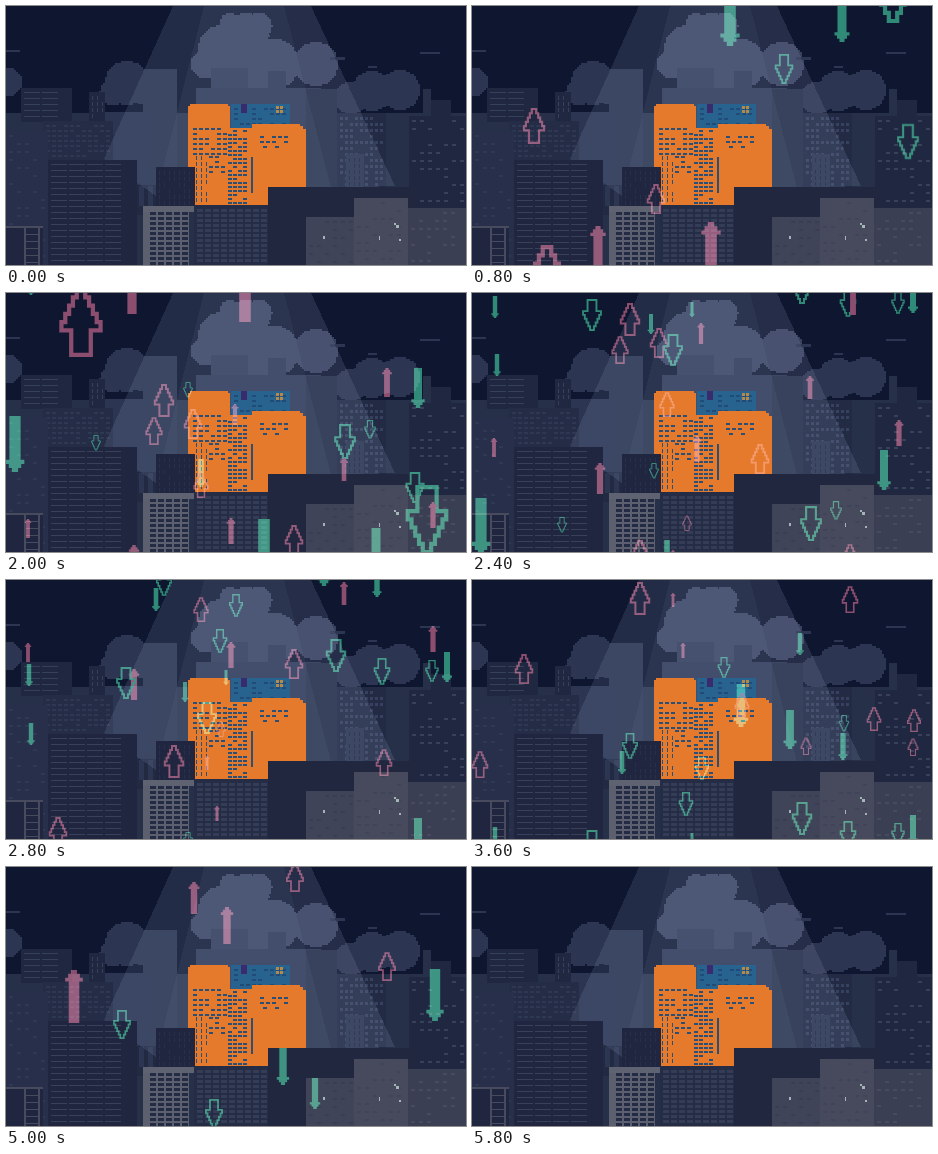
An HTML page for the animation above (6 s loop, 460 by 259 pixels).

```html
<!DOCTYPE html>
<html lang="en">
<head>
<meta charset="utf-8">
<title>City arrows</title>
<style>
  html, body { margin: 0; width: 100%; height: 100%; overflow: hidden; background: #0f1630; }
  svg { display: block; width: 100vw; height: 100vh; }
  #arrows { mix-blend-mode: screen; }
</style>
</head>
<body>
<svg viewBox="0 0 460 259" preserveAspectRatio="none">
  <rect width="460" height="259" fill="#0f1630"/>
  <g id="city" shape-rendering="crispEdges"></g>
  <g id="arrows"></g>
</svg>
<script>
const LOOP = 6000, STEP = 200, MID = 2800, HEIGHT = 259;
const SPEED = 40.75 / STEP;
const PINK = '#853d4e', GREEN = '#228058';

let seed = 7;
const random = () => (seed = (seed * 16807) % 2147483647) / 2147483647;
const between = (low, high) => low + random() * (high - low);

const cell = (x, y, w, h) => `M${x} ${y}h${w}v${h}h${-w}z`;
const path = (d, fill, alpha = 1) => `<path d="${d}" fill="${fill}" opacity="${alpha}"/>`;
const box = (x, y, w, h, fill) => path(cell(x, y, w, h), fill);

// Window patterns: horizontal pitch, vertical pitch, window size, share drawn.
const FLOORS = { dx: 18, dy: 6, w: 16, h: 1, keep: 1 };
const SLITS = { dx: 5, dy: 6, w: 1, h: 4, keep: .8 };
const PANES = { dx: 5, dy: 6, w: 3, h: 3, keep: .75 };
const WIDE = { dx: 8, dy: 5, w: 6, h: 3, keep: 1 };
const ROWS = { dx: 6, dy: 5, w: 4, h: 2, keep: .75 };
const STRIP = { dx: 5, dy: 4, w: 4, h: 2, keep: .78 };
const SPARSE = { dx: 8, dy: 8, w: 4, h: 2, keep: .42 };

function windows(x, y, w, h, fill, style) {
  let d = '';
  for (let j = y; j + style.h <= y + h; j += style.dy)
    for (let i = x; i + style.w <= x + w; i += style.dx)
      if (random() < style.keep) d += cell(i, j, style.w, style.h);
  return path(d, fill);
}

const tower = (x, y, w, h, fill, lit, style) =>
  box(x, y, w, h, fill) + windows(x + 3, y + 4, w - 5, h - 5, lit, style);

// A cloud is a few discs cut into rows of two pixels.
function cloud(fill, ...puffs) {
  let d = '';
  for (const [cx, cy, r] of puffs)
    for (let y = -r; y < r; y += 2) {
      const half = Math.round(Math.sqrt(r * r - (y + 1) ** 2) / 2) * 2;
      d += cell(cx - half, cy + y, half * 2, 2);
    }
  return path(d, fill);
}

function sky() {
  const haze = '#2c3551';
  return cloud(haze, [2, 76, 14], [121, 77, 22], [107, 86, 13], [138, 84, 14],
      [366, 85, 20], [394, 84, 20], [345, 92, 16]) +
    cloud('#38425f', [240, 30, 23], [224, 17, 10], [253, 20, 13], [216, 43, 24], [199, 58, 14],
      [268, 58, 25], [310, 58, 22], [237, 70, 30]) +
    path(cell(0, 44, 14, 2) + cell(414, 46, 20, 2) + cell(362, 60, 9, 2) + cell(324, 51, 15, 3), haze);
}

function backBuildings() {
  const far = '#2c3653', near = '#263049', dark = '#202841', lit = '#354059';
  return box(0, 107, 460, 152, near) +
    box(205, 62, 37, 50, '#303a57') + box(262, 65, 18, 60, far) +
    box(190, 82, 125, 60, far) + box(137, 63, 34, 130, '#2b3550') + box(98, 106, 44, 80, far) +
    tower(15, 82, 51, 34, dark, lit, FLOORS) +
    tower(83, 86, 16, 30, dark, lit, SLITS) +
    tower(37, 115, 70, 60, '#242c46', '#2f3852', ROWS) +
    tower(0, 125, 42, 134, '#272f4a', '#303954', SPARSE) +
    box(131, 179, 20, 30, '#222a42') + windows(133, 180, 16, 20, far, { dx: 9, dy: 20, w: 5, h: 20, keep: 1 }) +
    box(300, 83, 31, 100, '#262f49') +
    tower(331, 107, 49, 74, '#222a44', '#36415f', PANES) +
    tower(340, 148, 18, 33, '#2c3651', dark, SLITS) +
    box(417, 83, 8, 30, near) + box(425, 94, 20, 20, dark) +
    tower(403, 110, 57, 100, dark, '#39415a', SPARSE);
}

function beams() {
  const light = '#9fb0d0';
  return path('M167 0H198L150 190 98 153z', light, .14) +
    path('M198 0H278L325 182 150 190z', light, .2) +
    path('M278 0H305L389 180 325 182z', light, .15);
}

function landmark() {
  const orange = '#e67a2c', blue = '#28628f', deep = '#2c4f75';
  return tower(225, 98, 59, 24, blue, '#214c78', ROWS) + box(235, 98, 6, 9, '#3a2c6c') +
    windows(270, 100, 8, 8, '#b4894c', { dx: 4, dy: 4, w: 3, h: 3, keep: 1 }) +
    path('M184 98h38v2h2v22h22v-4h48v2h3v3h3v58h-38v18h-73v-38h-7v-61h2z', orange) +
    windows(187, 122, 36, 28, deep, ROWS) +
    windows(190, 150, 12, 48, deep, SLITS) +
    windows(203, 150, 17, 20, deep, ROWS) +
    windows(222, 124, 20, 74, deep, STRIP) +
    box(245, 151, 2, 36, deep) +
    windows(254, 130, 33, 8, deep, ROWS) + windows(257, 140, 20, 8, deep, ROWS);
}

function frontBuildings() {
  const dark = '#20263f', line = '#394159', grey = '#404458', rail = '#474b5d';
  return tower(42, 154, 89, 105, dark, line, FLOORS) +
    box(0, 220, 37, 39, dark) +
    path(cell(0, 220, 37, 2) + cell(18, 222, 2, 37) + cell(32, 222, 2, 37), rail) +
    windows(20, 228, 13, 31, rail, { dx: 18, dy: 7, w: 13, h: 1, keep: 1 }) +
    tower(150, 161, 39, 39, dark, '#282f49', SLITS) +
    tower(188, 199, 75, 60, '#252c46', '#353d56', WIDE) +
    box(262, 181, 148, 78, '#21273f') +
    box(137, 200, 51, 6, '#5f6371') + box(137, 206, 46, 53, '#5b5f6e') +
    windows(144, 206, 38, 53, '#242b45', WIDE) +
    tower(300, 211, 50, 48, grey, '#3a3e53', SPARSE) +
    tower(402, 202, 58, 57, '#3b3f54', rail, SPARSE) +
    tower(348, 192, 54, 67, '#474a5c', grey, SPARSE) +
    path(cell(388, 217, 2, 2) + cell(390, 219, 3, 3) + cell(393, 233, 2, 2) +
      cell(373, 230, 1, 4) + cell(317, 230, 2, 3), '#a4b5b8');
}

document.getElementById('city').innerHTML =
  sky() + backBuildings() + beams() + landmark() + frontBuildings();

// Profiles run from tip to tail: a stair of equal steps, then the shaft.
function profile(steps, dx, dy, first, shaft, tail) {
  const half = [];
  for (let i = 0; i < steps; i++)
    half.push([first + i * dx, i * dy], [first + i * dx, (i + 1) * dy]);
  half.push([shaft, steps * dy], [shaft, tail]);
  return 'M' + [...half, ...half.map(([x, y]) => [-x, y]).reverse()].join(' ') + 'z';
}
const HOLLOW = { units: 16, d: profile(5, .9, 1.95, 1, 2.3, 15.5) };
const SOLID = { units: 18, d: profile(3, 1, 1.3, 1, 1.8, 18) };

const layer = document.getElementById('arrows');
const arrows = [];

// y is the top edge at MID.
function addArrow(shape, dir, x, y, h) {
  const color = dir < 0 ? PINK : GREEN;
  const node = document.createElementNS('http://www.w3.org/2000/svg', 'path');
  node.setAttribute('d', shape.d);
  node.setAttribute('fill', shape === SOLID ? color : 'none');
  if (shape === HOLLOW) node.setAttribute('stroke', color);
  layer.append(node);
  arrows.push({ node, x, y, h, dir, scale: h / shape.units });
}

// The large arrows and those that open and close the shower: x, y, height.
function addLeaders(shape, dir, ...leaders) {
  for (const leader of leaders) addArrow(shape, dir, ...leader);
}
addLeaders(SOLID, -1, [126, -188, 46], [239, -192, 58], [68, 551, 53], [188, 463, 32], [221, 488, 37]);
addLeaders(HOLLOW, -1, [62, -305, 35], [184, -229, 29], [75, -167, 68], [158, -71, 32],
  [168, 166, 32], [289, 445, 28], [381, 534, 28]);
addLeaders(SOLID, 1, [258, 389, 58], [370, 398, 45], [9, 286, 56], [412, 238, 40],
  [269, -59, 43], [318, -33, 39], [429, -346, 52], [277, -267, 37], [309, -237, 31]);
addLeaders(HOLLOW, 1, [421, 355, 67], [312, 455, 29], [436, 525, 34], [339, 294, 34],
  [330, 59, 32], [116, -305, 28], [208, -216, 28]);

// Small arrows scattered over the middle of the loop.
for (let i = 0; i < 44; i++) {
  const dir = i % 2 ? 1 : -1;
  const crossing = between(1650, 4150);
  const h = Math.round(between(14, 31));
  const y = HEIGHT / 2 - h / 2 + dir * SPEED * (MID - crossing);
  addArrow(i % 5 < 2 ? SOLID : HOLLOW, dir, Math.round(between(8, 452)), y, h);
}

function draw(time) {
  const t = Math.floor((time % LOOP) / STEP) * STEP;
  for (const { node, x, y, h, dir, scale } of arrows) {
    const top = Math.round(y + dir * SPEED * (t - MID));
    const visible = top < HEIGHT && top + h > 0;
    node.setAttribute('display', visible ? 'inline' : 'none');
    if (visible) node.setAttribute('transform',
      `translate(${x} ${dir < 0 ? top : top + h}) scale(${scale} ${-dir * scale})`);
  }
}

const start = performance.now();
function tick() {
  draw(performance.now() - start);
  requestAnimationFrame(tick);
}
tick();
</script>
</body>
</html>
```
